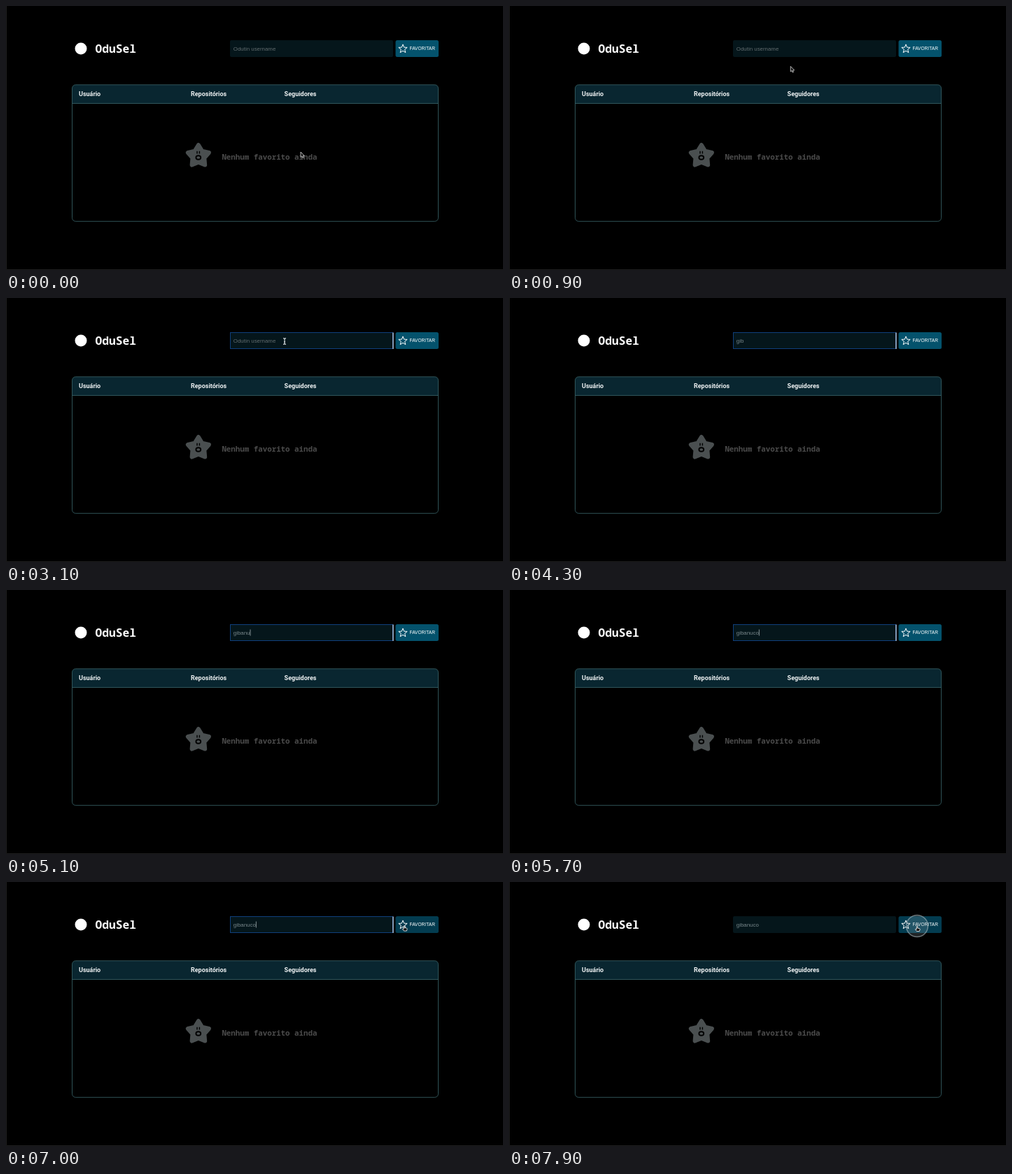
Recreate the animation shown at these times as an HTML page. Size 710 by 378 pixels, loop 8000 ms.

```html
<!DOCTYPE html>
<html lang="pt-BR">
<head>
<meta charset="utf-8">
<title>Favoritos</title>
<style>
  html, body { margin: 0; width: 100%; height: 100%; overflow: hidden; background: #000; }
  svg { display: block; width: 100%; height: 100%; }
  text { white-space: pre; }
  .brand { font: bold 16.2px "Noto Sans Mono", monospace; fill: #fff; }
  .empty { font: 600 10.8px "Noto Sans Mono", monospace; fill: #4b4b4b; }
  .head { font: bold 9px Roboto, sans-serif; fill: #eef1f2; }
  .field { font: 7.9px "Liberation Sans", Arial, sans-serif; }
  .action { font: 6.6px "Liberation Sans", Arial, sans-serif; fill: #fff; }
</style>
</head>
<body>
<svg viewBox="0 0 710 378">
  <path d="M.5 0V377.5H710" fill="none" stroke="#1f1f1f"/>

  <circle cx="107" cy="61" r="8.5" fill="#fff"/>
  <text class="brand" x="127.6" y="67">OduSel</text>

  <rect x="320" y="49" width="233" height="24" rx="2" fill="#05161b"/>
  <g id="focus">
    <rect x="320.5" y="49.5" width="232" height="23" fill="none" stroke="#0f3f7c"/>
    <path d="M553 49.5V73" stroke="#c3d8f4" stroke-width="1.3"/>
  </g>
  <text id="value" class="field" x="324.8" y="63.8"></text>
  <path id="caret" d="M0 56.5V65.5" stroke="#a5b0b4" stroke-width=".8"/>

  <rect id="button" x="556.5" y="49" width="61.5" height="24" rx="2.5"/>
  <path id="icon" fill="none" stroke="#fff" stroke-linejoin="round"/>
  <text class="action" x="576.5" y="63.3">FAVORITAR</text>

  <path d="M94.5 139.5V118a5 5 0 0 1 5-5H612.500a5 5 0 0 1 5 5V139.500Z" fill="#092630"/>
  <rect x="94.500" y="112.800" width="523" height="195.500" rx="5" fill="none" stroke="#3b686c" stroke-width=".8"/>
  <path d="M94.500 139.500H617.500" stroke="#3b686c" stroke-width=".8"/>
  <text class="head" x="104" y="129">Usuário</text>
  <text class="head" x="264" y="129">Repositórios</text>
  <text class="head" x="397.600" y="129">Seguidores</text>

  <path id="face" fill="#4a4f50" stroke="#4a4f50" stroke-width="6" stroke-linejoin="round"/>
  <path d="M273 207.800v3.600M276.400 207.800v3.600" stroke="#000" stroke-width="1.400"/>
  <ellipse cx="274.800" cy="217" rx="3.400" ry="2.800" fill="none" stroke="#000" stroke-width="1.900"/>
  <text class="empty" x="308.400" y="219.700">Nenhum favorito ainda</text>

  <circle id="ripple" fill="#9fb4bd" fill-opacity=".2" stroke="#a9b8be" stroke-opacity=".6" stroke-width="1.500"/>
  <g id="cursor">
    <path id="arrow" d="M0 0V7.600L1.700 6.100 2.900 8.700 4.200 8.100 3.100 5.600H5.400Z" fill="#111" stroke="#ddd" stroke-width=".8"/>
    <path id="beam" d="M-2-4.300Q0-4.300 0-3Q0-4.300 2-4.300M0-3V3M-2 4.300Q0 4.300 0 3Q0 4.300 2 4.300M-1 .8H1" fill="none" stroke="#d5dcde" stroke-width="1.200"/>
    <path id="hand" d="M-.7.400Q0-.5.700.400V3L3.700 3.700Q4.300 4 4.100 5L3.300 7.500H-.6L-2.600 4.700Q-2.500 3.700-.7 4.700Z" fill="#111" stroke="#fff" stroke-width=".8"/>
  </g>
</svg>
<script>
const LOOP = 8000, FOCUS = 1100, BLUR = 7700, BLINK = 600;
const NAME = "gibanuco", HINT = "Odutin username";
const keys = [3300, 3400, 3600, 4400, 4600, 5100, 5300, 5500];

// time, x, y
const firstMove = [[0, 421, 209], [80, 421, 209], [200, 417, 171], [450, 417, 171], [1100, 398, 62]];
const lastMove = [[6000, 596, 115], [6100, 592, 80], [6200, 585, 40], [6400, 585, 40],
                  [7000, 569, 62.5], [7250, 569, 62.5], [7650, 583, 63]];

const el = Object.fromEntries([...document.querySelectorAll("[id]")].map(e => [e.id, e]));
const show = (e, on) => e.setAttribute("visibility", on ? "visible" : "hidden");
const clamp = v => Math.max(0, Math.min(1, v));

function star(cx, cy, r, ratio) {
  const points = Array.from({ length: 10 }, (_, i) => {
    const a = i * Math.PI / 5, d = i % 2 ? r * ratio : r;
    return (cx + d * Math.sin(a)).toFixed(2) + " " + (cy - d * Math.cos(a)).toFixed(2);
  });
  return "M" + points.join("L") + "Z";
}

function along(path, t) {
  const i = path.findIndex(p => p[0] > t);
  if (i < 0) return path.at(-1).slice(1);
  const [t0, x0, y0] = path[i - 1], [t1, x1, y1] = path[i];
  const u = (t - t0) / (t1 - t0), e = u * u * (3 - 2 * u);
  return [x0 + (x1 - x0) * e, y0 + (y1 - y0) * e];
}

function drawField(t) {
  const typed = keys.filter(k => k <= t), focused = t >= FOCUS && t < BLUR;
  el.value.textContent = typed.length ? NAME.slice(0, typed.length) : HINT;
  el.value.setAttribute("fill", typed.length ? "#78868a" : "#626c6f");
  const width = typed.length ? el.value.getComputedTextLength() : 0;
  const since = t - (typed.at(-1) ?? FOCUS);
  el.caret.setAttribute("transform", `translate(${325.3 + width})`);
  show(el.focus, focused);
  show(el.caret, focused && Math.floor(since / BLINK) % 2 === 0);
}

function drawPointer(t) {
  const late = t >= 6000, visible = late || t < keys[0];
  const [x, y] = along(late ? lastMove : firstMove, late ? t : Math.min(t, keys[0]));
  const inRow = y >= 49 && y <= 73;
  const onField = inRow && x >= 320 && x <= 553;
  const onButton = inRow && x >= 557 && x <= 618;
  el.cursor.setAttribute("transform", `translate(${x} ${y})`);
  show(el.arrow, visible && !onField && !onButton);
  show(el.beam, visible && onField);
  show(el.hand, visible && onButton);
  el.button.setAttribute("fill", onButton ? "#033c50" : "#04526c");

  const age = t - (late ? BLUR : FOCUS);
  const grow = clamp(age / 120), fade = late ? 1 : 1 - clamp((age - 180) / 170);
  el.ripple.setAttribute("cx", x);
  el.ripple.setAttribute("cy", y);
  el.ripple.setAttribute("r", 15.5 * grow * (0.7 + 0.3 * fade));
  el.ripple.setAttribute("opacity", grow * fade);
}

function frame(now) {
  const t = now % LOOP;
  drawField(t);
  drawPointer(t);
  requestAnimationFrame(frame);
}

el.icon.setAttribute("d", star(567, 61.4, 6.5, 0.43));
el.face.setAttribute("d", star(274.9, 214.8, 15.8, 0.56));
frame(performance.now());
</script>
</body>
</html>
```
